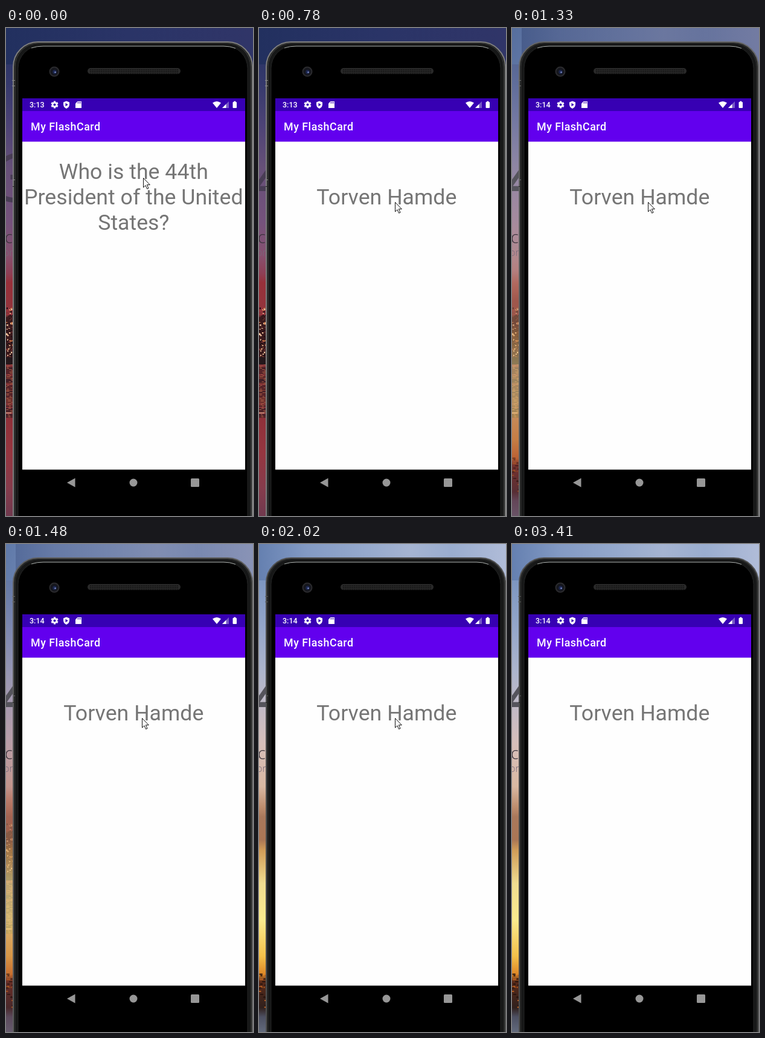
An HTML page with a canvas that plays this animation: 409x805 px, repeating every 3720 ms.

```html
<!DOCTYPE html>
<html lang="en">
<head>
<meta charset="utf-8">
<title>My FlashCard</title>
<style>
  html, body { margin: 0; width: 100%; height: 100%; overflow: hidden; background: #000; }
  canvas { display: block; }
</style>
</head>
<body>
<canvas id="stage" width="409" height="805"></canvas>
<script>
const W = 409, H = 805, LOOP = 3720;
const c = document.getElementById('stage').getContext('2d');
const FADE_TIMES = [1090, 1210, 1330, 1480, 1600, 1750, 1870, 2020];
// time, x, y of the pointer; each position holds until the next
const POINTER = [
  [0, 227, 247], [390, 227, 255], [510, 226, 270], [630, 225, 283], [780, 225, 287],
  [2170, 226, 287], [2290, 228, 287], [2440, 230, 287], [2590, 236, 289],
  [3020, 250, 370], [3140, 286, 600], [3260, 306, 720]
];

function rect(x, y, w, h, color) {
  c.fillStyle = color;
  c.fillRect(x, y, w, h);
}

function round(x, y, w, h, r, color) {
  c.fillStyle = color;
  c.beginPath();
  c.roundRect(x, y, w, h, r);
  c.fill();
}

function disc(x, y, r, color) {
  c.fillStyle = color;
  c.beginPath();
  c.arc(x, y, r, 0, 7);
  c.fill();
}

function shape(d, color, x = 0, y = 0) {
  c.save();
  c.translate(x, y);
  c.fillStyle = color;
  c.fill(new Path2D(d));
  c.restore();
}

function text(s, x, y, font, color, align = 'left', spacing = 0) {
  c.font = font;
  c.fillStyle = color;
  c.textAlign = align;
  c.letterSpacing = spacing + 'px';
  c.fillText(s, x, y);
}

function gradient(x, y, stops) {
  const g = c.createLinearGradient(0, 0, x, y);
  stops.forEach(([at, color]) => g.addColorStop(at / (x + y), color));
  return g;
}

function random(seed) {
  return () => (seed = seed * 16807 % 2147483647) / 2147483647;
}

const dusk = gradient(0, H, [
  [0, '#22305f'], [90, '#35396c'], [160, '#4d4376'], [230, '#665078'], [320, '#75527c'],
  [375, '#87516f'], [405, '#8e3f55'], [420, '#97303a'], [460, '#93343c'], [640, '#8f3039'],
  [700, '#963640'], [760, '#853c4c'], [805, '#70394e']
]);
const dawn = gradient(0, H, [
  [0, '#6580b0'], [60, '#7d96c0'], [140, '#95a7ca'], [210, '#adb5cc'], [270, '#c2bac6'],
  [330, '#d6bfba'], [400, '#d9b8a2'], [435, '#bd8c6d'], [450, '#a9785b'], [488, '#aa7655'],
  [505, '#d09c58'], [560, '#f0dc90'], [620, '#faeb8e'], [680, '#f3c04a'], [710, '#dd8727'],
  [722, '#592a19'], [765, '#30201d'], [780, '#4d5062'], [805, '#626a7c']
]);
const duskTop = gradient(W, 0, [[0, '#22305f'], [200, '#2a3467'], [409, '#303568']]);
const dawnTop = gradient(W, 0, [
  [0, '#6580b0'], [80, '#839ac4'], [170, '#94a8cc'], [250, '#a5b4d2'], [320, '#9aadcf'], [409, '#b0bcd8']
]);

function drawDusk() {
  rect(0, 0, 16, H, dusk);
  rect(0, 0, W, 60, duskTop);
  const rnd = random(73);
  rect(0, 474, 14, 70, '#3a191c');
  for (let i = 0; i < 85; i++) {
    const y = 461 + rnd() * 82;
    const color = ['#f5c6a0', '#c87343', '#190d14', '#703032'][Math.floor(rnd() * 4)];
    rect(Math.floor(rnd() * 12), Math.floor(y), 1 + rnd() * 2, 1 + rnd() * 2, color);
  }
  rect(0, 543, 14, 12, '#24171b');
  for (let y = 555; y < 642; y += 2) {
    rect(0, y, 14, 2, ['#572329', '#71312e', '#421e27', '#86333a'][Math.floor(rnd() * 4)]);
    rect(rnd() * 9, y, 2 + rnd() * 4, 1, '#a45b43');
  }
  rect(0, 634, 9, 2, '#bc8073');
}

function drawDawn() {
  rect(0, 0, 16, H, dawn);
  rect(0, 0, W, 60, dawnTop);
  const rnd = random(19);
  for (let i = 0; i < 20; i++) {
    rect(rnd() * 10, 708 + rnd() * 58, 2 + rnd() * 4, 2, rnd() > .5 ? '#b75d20' : '#29150f');
  }
}

function drawDesktop(fade, digit) {
  drawDusk();
  if (fade) {
    c.globalAlpha = fade;
    drawDawn();
    c.globalAlpha = 1;
  }
  const ink = fade > .4 ? '#55545c' : '#493d55';
  text(digit, -10, 287, '112px "Open Sans", sans-serif', ink);
  text('c', -2, 355, '300 27px "Open Sans", sans-serif', '#38323a');
  text('or', -4, 376, '300 16px "Open Sans", sans-serif', '#77697a');
}

function body(inset, top, radius, color, line) {
  c.beginPath();
  c.roundRect(inset, top, 420 - inset * 2, 900, radius);
  c.fillStyle = color;
  c.fill();
  c.strokeStyle = line;
  c.stroke();
}

function drawPhone(fade) {
  const edge = 125 - 45 * fade;
  const grey = k => `rgb(${edge * k},${edge * k},${edge * k})`;
  c.lineWidth = 2;
  body(12, 23, 41, '#222423', grey(1));
  c.lineWidth = 1;
  body(15, 25, 39, '#161717', grey(.5));
  body(20, 29.5, 37, '#000', '#242525');
  rect(10, 86, 5, 1, grey(1.1));
  rect(10, 95, 5, 1, grey(1.1));
  rect(11, 250, 4, 1, grey(1.1));
  rect(11, 261, 4, 1, '#222');
  c.strokeStyle = '#a9adab';
  c.beginPath();
  c.moveTo(42, 33);
  c.quadraticCurveTo(51, 30, 62, 30);
  c.lineTo(360, 30);
  c.quadraticCurveTo(371, 30, 380, 33.5);
  c.stroke();

  disc(80, 72, 8.5, '#2b2b2e');
  disc(80, 72, 6.5, '#15161d');
  disc(80.5, 72.5, 3.2, '#1c2750');
  disc(81.5, 73, 1.2, '#8796cd');
  round(135, 66, 154, 10, 5, '#292929');
  for (let x = 139; x < 286; x += 3) {
    for (let y = 68; y < 75; y += 3) rect(x, y, 2, 2, '#161616');
  }

  shape('M101 750L114.5 742.5V757.5Z', '#979797');
  disc(211, 750, 6.5, '#979797');
  round(306, 743, 14, 14, 1.5, '#979797');
}

function drawStatus(clock) {
  rect(27, 116, 369, 21, '#3700b3');
  text(clock, 39, 131, '500 12.5px Roboto, sans-serif', '#fff');

  for (let i = 0; i < 6; i++) {
    c.save();
    c.translate(80.5, 126.5);
    c.rotate(i * Math.PI / 3);
    rect(-1.6, -6, 3.2, 4, '#fff');
    c.restore();
  }
  disc(80.5, 126.5, 4.5, '#fff');
  disc(80.5, 126.5, 2, '#3700b3');
  shape('M0-6L5-4V0Q4.5 4.5 0 6.5Q-4.5 4.5-5 0V-4Z', '#fff', 100, 126.5);
  shape('M-1.5-2.8L2.8 0L-1.5 2.8Z', '#3700b3', 100, 126.5);
  shape('M115 124.5L118.5 121H125V132H115Z', '#fff');
  for (const x of [118.5, 120.7, 122.9]) rect(x, 122, 1, 2.5, '#3700b3');

  shape('M342 123.5Q349 118.5 356 123.5L349 132Z', '#fff');
  shape('M358 132L369 121V132Z', '#785bc7');
  shape('M358 132L364.5 125.5V132Z', '#fff');
  round(375.5, 122, 6.5, 10, 1, '#fff');
  rect(377.3, 120.7, 3, 2, '#fff');
}

function drawApp(t) {
  drawStatus(t < 1330 ? '3:13' : '3:14');
  rect(27, 137, 369, 51, '#6200ee');
  rect(27, 187.5, 369, 541, '#fefefe');
  text('My FlashCard', 41, 169, '500 17.86px Roboto, sans-serif', '#fff', 'left', .5);
  const lines = t < 120
    ? ['Who is the 44th', 'President of the United', 'States?']
    : ['', 'Torven Hamde'];
  lines.forEach((line, i) =>
    text(line, 211.3, 249 + i * 42, '35.7px Roboto, sans-serif', '#757575', 'center'));
}

function drawPointer(x, y) {
  const arrow = new Path2D('M.5.5V16L4 12.7L6.6 18.4L9 17.3L6.4 11.7H11.3Z');
  c.save();
  c.translate(x, y);
  c.fillStyle = '#fff';
  c.strokeStyle = '#111';
  c.lineWidth = 1;
  c.fill(arrow);
  c.stroke(arrow);
  c.restore();
}

function draw(now) {
  const t = now % LOOP;
  const step = FADE_TIMES.filter(time => time <= t).pop();
  const fade = step ? Math.sin((step - 960) / 1060 * Math.PI / 2) : 0;
  drawDesktop(fade, t < 780 ? '3' : '4');
  drawPhone(fade);
  drawApp(t);
  if (t < 3410) {
    const [, x, y] = POINTER.filter(([time]) => time <= t).pop();
    drawPointer(x, y);
  }
}

const start = performance.now();
function tick() {
  draw(performance.now() - start);
  requestAnimationFrame(tick);
}
tick();
</script>
</body>
</html>
```
